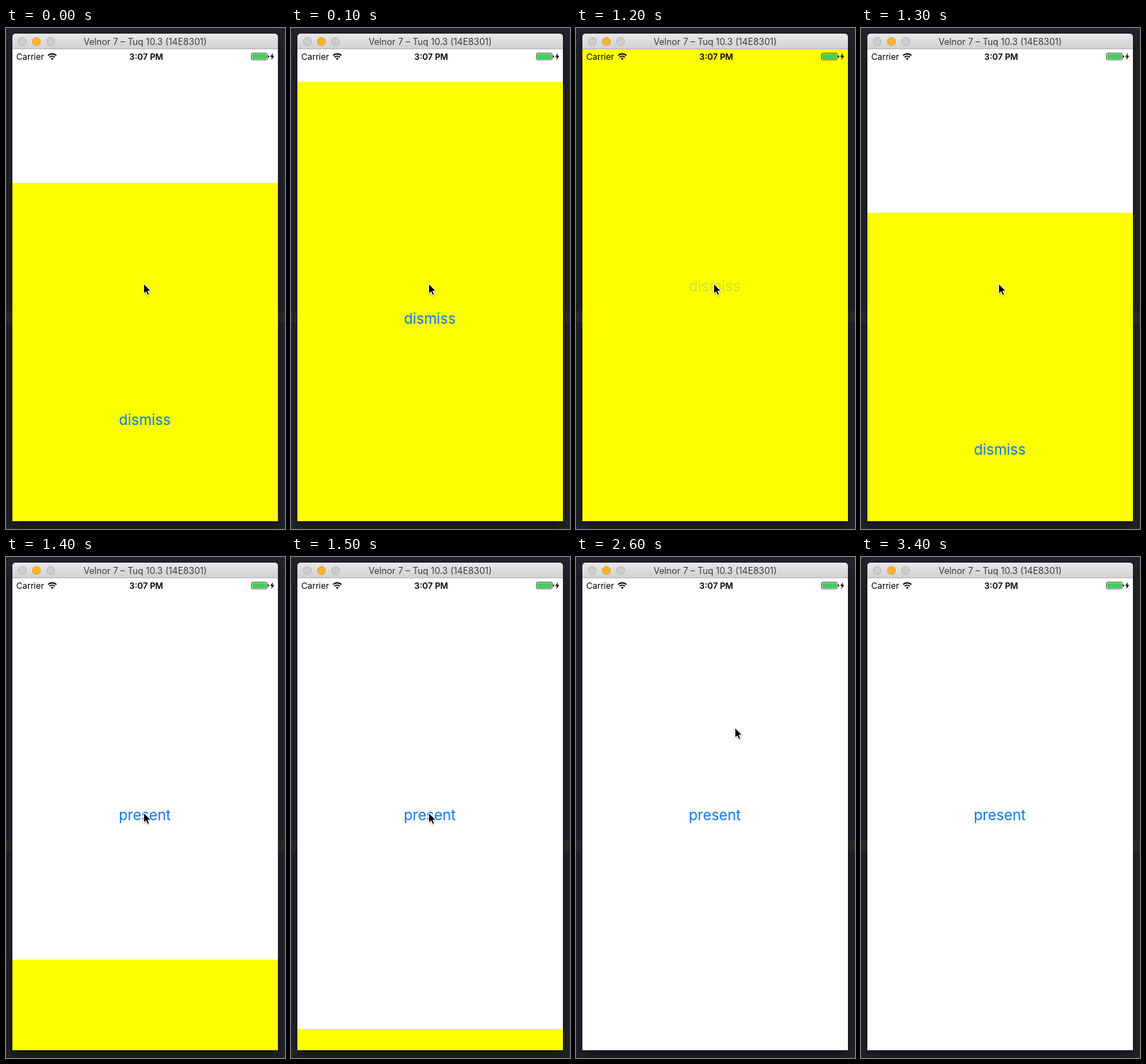
These frames come from a looping animation (394 by 708 pixels, 3500 ms). An HTML page:

```html
<!DOCTYPE html>
<html lang="en">
<head>
<meta charset="utf-8">
<title>Modal presentation</title>
<style>
  html, body { margin: 0; width: 100%; height: 100%; overflow: hidden; background: #23232d; }
  svg { display: block; width: 394px; height: 708px; }
  text { font-family: Inter, Roboto, sans-serif; }
  .button { font-size: 20.5px; fill: #0b76ee; text-anchor: middle; }
  .status { font-size: 12px; fill: #000; }
</style>
</head>
<body>
<svg viewBox="0 0 394 708">
  <defs>
    <linearGradient id="bar" x2="0" y2="1">
      <stop offset="0" stop-color="#e9e9e9"/>
      <stop offset="1" stop-color="#d0d0d0"/>
    </linearGradient>
    <clipPath id="screen"><rect x="9" y="30" width="375" height="667"/></clipPath>
    <filter id="shadow" x="-20%" y="-20%" width="140%" height="140%">
      <feDropShadow dx="0" dy="8" stdDeviation="9" flood-color="#000" flood-opacity=".5"/>
    </filter>
    <filter id="soft" x="-50%" y="-50%" width="200%" height="200%">
      <feDropShadow dx="0" dy="1" stdDeviation=".8" flood-color="#000" flood-opacity=".35"/>
    </filter>
  </defs>

  <rect width="394" height="708" fill="#23232d"/>
  <rect y="400" width="394" height="16" fill="#2d2d2f"/>
  <path d="M9 697V13a5 5 0 0 1 5-5H379a5 5 0 0 1 5 5V697Z" fill="#fff" filter="url(#shadow)"/>

  <path d="M9 30V13a5 5 0 0 1 5-5H379a5 5 0 0 1 5 5V30Z" fill="url(#bar)"/>
  <rect x="9" y="29" width="375" height="1" fill="#b4b4b4"/>
  <g fill="#cdcdcd" stroke="#b6b6b6">
    <circle cx="23" cy="19" r="5.6"/>
    <circle cx="43" cy="19" r="5.6" fill="#fdb42b" stroke="#e09e28"/>
    <circle cx="63" cy="19" r="5.6"/>
  </g>
  <text x="196.5" y="24" font-size="12.6" fill="#3c3c3c" text-anchor="middle">Velnor 7 – Tuq 10.3 (14E8301)</text>

  <g clip-path="url(#screen)">
    <text class="button" x="196" y="372">present</text>
    <g id="modal">
      <rect x="9" y="30" width="375" height="667" fill="#ff0"/>
      <text id="dismiss" class="button" x="196" y="372">dismiss</text>
    </g>
  </g>

  <text class="status" x="14.5" y="45">Carrier</text>
  <text class="status" x="198" y="45" font-weight="600" text-anchor="middle">3:07 PM</text>
  <g fill="none" stroke="#000" stroke-width="1.9">
    <path d="M59.4 38.9a8.6 8.6 0 0 1 11.8 0"/>
    <path d="M61.6 41.3a5.4 5.4 0 0 1 7.4 0"/>
    <path d="M65.3 45.2l-2-2.1a2.9 2.9 0 0 1 4 0Z" fill="#000" stroke="none"/>
  </g>
  <rect x="346.5" y="35.5" width="22.5" height="9.5" rx="1.8" fill="none" stroke="#333" stroke-width=".8"/>
  <rect x="347.5" y="36.5" width="20.5" height="7.5" rx=".8" fill="#43cf5c"/>
  <path d="M369.8 38.6a1.7 1.7 0 0 1 0 3.4Z"/>
  <path d="M377 35.5l-4 5.3h2.5l-1 4.4 4.4-5.7h-2.6Z"/>

  <path id="cursor" d="M0 0V14.2L3.3 11.2 5.4 16.2 7.9 15.1 5.8 10.3H10.2Z"
        fill="#000" stroke="#fff" stroke-width="1" filter="url(#soft)"/>
</svg>
<script>
const LOOP = 3500, STEP = 100, HEIGHT = 667;
const PRESENT = -138, PRESS = 1100, DISMISS = 1233;
const MOVE = 2200, LEAVE = 3000;
const [modal, dismiss, cursor] = ['modal', 'dismiss', 'cursor'].map(id => document.getElementById(id));

// Remaining distance (1 to 0) of a critically damped spring.
function spring(ms) {
  const x = Math.sqrt(1000 / 3) * Math.max(0, ms) / 1000;
  return (1 + x) * Math.exp(-x);
}

function modalOffset(t) {
  const left = t < DISMISS ? spring(t - PRESENT) : 1 - spring(t - DISMISS);
  return Math.round(HEIGHT * left);
}

function render(t) {
  modal.setAttribute('transform', `translate(0 ${modalOffset(t)})`);
  dismiss.setAttribute('opacity', t > PRESS && t < DISMISS ? 0.2 : 1);

  const u = Math.max(0, (t - MOVE) / 400);
  const x = Math.round(195 + 30 * u), y = Math.round(362 - 120 * u ** 1.6);
  cursor.setAttribute('transform', `translate(${x - 0.5} ${y - 0.5})`);
  cursor.setAttribute('visibility', t < LEAVE ? 'visible' : 'hidden');
}

const start = performance.now();
function tick() {
  const t = (performance.now() - start) % LOOP;
  render(Math.floor(t / STEP) * STEP);
  requestAnimationFrame(tick);
}
tick();
</script>
</body>
</html>
```
